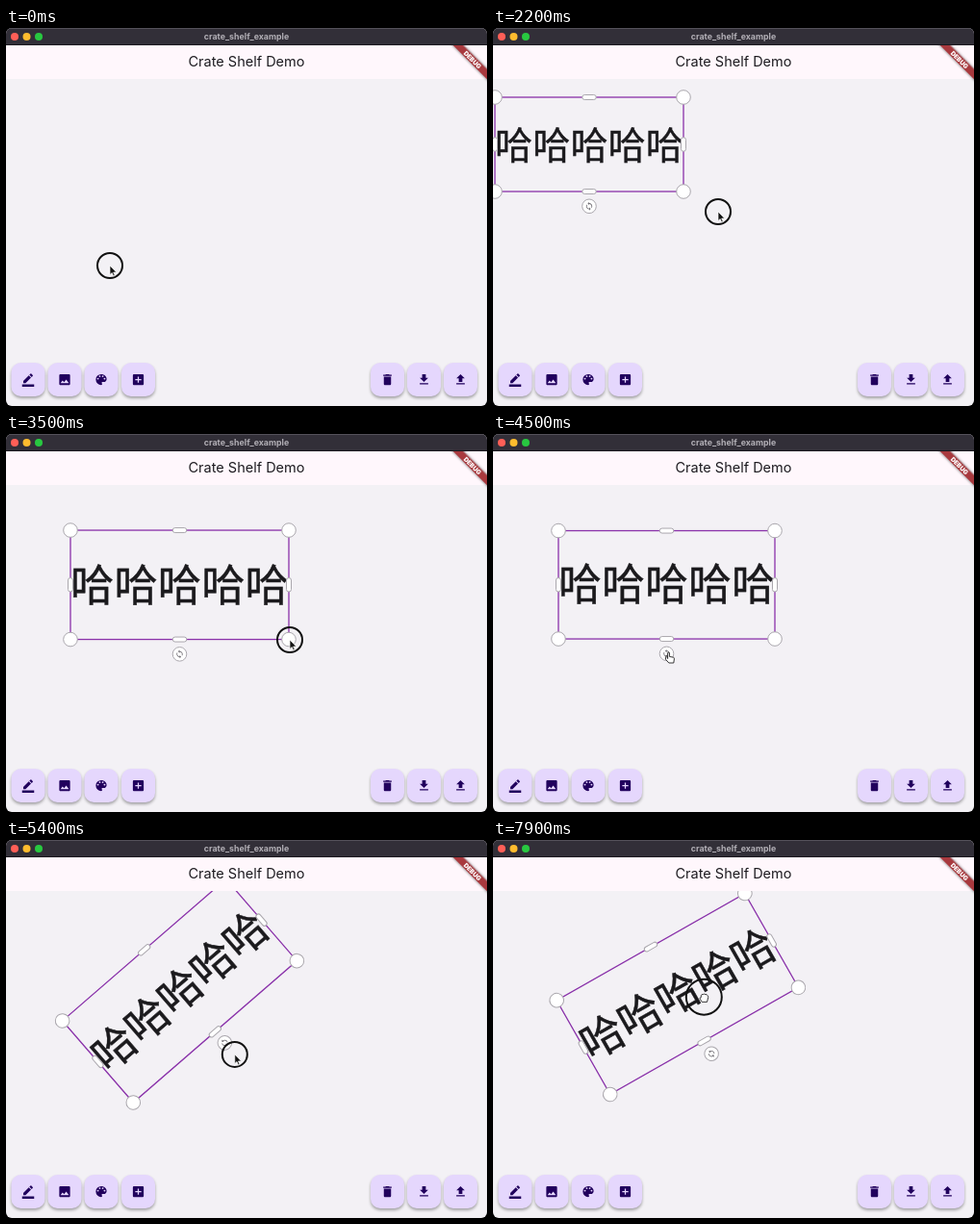
Write an HTML page that moves like this. It is 500 by 393 pixels and loops after 8 s.

```html
<!DOCTYPE html>
<html lang="zh-CN">
<head>
<meta charset="utf-8">
<style>
  html, body { margin: 0; width: 100%; height: 100%; overflow: hidden; background: #000; }
  svg { display: block; width: 100vw; height: 100vh; border-radius: 6px; }
  text { text-anchor: middle; font-family: Inter, Roboto, sans-serif; }
  .cjk { font-family: "Noto Sans CJK SC", "Noto Sans CJK", sans-serif; fill: #1b1a1d; }
  .fab { fill: #e5d7fd; filter: drop-shadow(0 2px 1.8px #0005); }
  .icon { fill: #21005d; }
  .knob { fill: #fff; stroke: #aaa7ad; stroke-width: 1; }
</style>
</head>
<body>
<svg viewBox="0 0 500 393">
  <defs>
    <clipPath id="board"><rect y="53" width="500" height="340"/></clipPath>
    <clipPath id="app"><rect y="18" width="500" height="375"/></clipPath>
  </defs>
  <rect width="500" height="393" fill="#f3f1f5"/>
  <rect y="18" width="500" height="35" fill="#fff7fc"/>
  <rect width="500" height="18" fill="#322f38"/>
  <path d="M0 .5H500" stroke="#55525b"/>
  <path d="M0 17.5H500" stroke="#1c1a20"/>
  <circle cx="9" cy="9" r="4" fill="#ff5f57"/>
  <circle cx="21.5" cy="9" r="4" fill="#febc2e"/>
  <circle cx="34" cy="9" r="4" fill="#28c840"/>
  <text x="250" y="11.7" font-size="8.8" font-weight="700" fill="#b3b0b7">crate_shelf_example</text>
  <text x="250" y="40" font-size="14.5" fill="#1d1b20">Crate Shelf Demo</text>

  <g clip-path="url(#board)">
    <g id="item">
      <rect id="frame" fill="none" stroke="#8a32aa" stroke-width="1.3"/>
      <text id="label" class="cjk" font-weight="500" stroke="#1b1a1d" stroke-width=".4">哈哈哈哈哈</text>
      <g id="field">
        <text class="cjk" x="-86" y="4.4" font-size="10.3">哈哈哈哈哈</text>
        <path d="M-112 15H112" stroke="#5c4a78"/>
        <path id="caret" d="M-61.5 -8V8" stroke="#3b3070" stroke-width="1.4"/>
      </g>
      <g id="knobs"></g>
      <g id="spin">
        <circle class="knob" r="7.3"/>
        <path fill="#6d6a70" transform="scale(.4) translate(-12 -12)" d="M12 4V1L8 5l4 4V6c3.31 0 6 2.69 6 6 0 1.01-.25 1.97-.7 2.8l1.46 1.46C19.54 15.03 20 13.57 20 12c0-4.42-3.58-8-8-8zm0 14c-3.31 0-6-2.69-6-6 0-1.01.25-1.97.7-2.8L5.24 7.74C4.46 8.97 4 10.43 4 12c0 4.42 3.58 8 8 8v3l4-4-4-4v3z"/>
      </g>
    </g>
  </g>

  <g id="fabs"></g>

  <g clip-path="url(#app)">
    <g transform="translate(500 18) rotate(45)">
      <rect x="-30" y="17.5" width="60" height="7.5" fill="#a8393e" style="filter:drop-shadow(0 0 1.8px #0009)"/>
      <text y="23.7" font-size="6.6" font-weight="900" fill="#fff">DEBUG</text>
    </g>
  </g>

  <g id="cursor">
    <circle id="ring" fill="none" stroke="#111" stroke-width="2"/>
    <path id="arrow" d="M0 0V9.5L2.2 7.6 3.7 11 5.2 10.3 3.7 7H6.8Z" fill="#111" stroke="#fff" stroke-width=".7"/>
    <path id="hand" transform="translate(-3.5 -2)" d="M2.6 1Q2.6 0 3.5 0T4.4 1V4.4L8.4 5.2Q9.6 5.5 9.4 6.8L8.8 11H3.8L.4 7.2Q1-.2 2.6 6.6Z" fill="#fff" stroke="#222" stroke-width=".9"/>
    <path id="fist" d="M-3 -1.5Q-2.5 -3.2 -1 -2.6Q.3 -3.6 1.5 -2.6Q3 -3.2 3.5 -1.6Q4.6 -1.4 4.4 .4L3.2 5.2H-2L-4.2 2Q-4.6 .4 -3 .4Z" fill="#fff" stroke="#222" stroke-width=".9"/>
  </g>
</svg>

<script>
const $ = id => document.getElementById(id);
const set = (el, attrs) => { for (const k in attrs) el.setAttribute(k, attrs[k]); return el; };
const add = (parent, tag, attrs) =>
  parent.appendChild(set(document.createElementNS("http://www.w3.org/2000/svg", tag), attrs));
const show = (id, on) => $(id).setAttribute("visibility", on ? "visible" : "hidden");

const buttons = [
  [23, "M22 24H2v-4h20v4zM13.06 5.19l3.75 3.75L7.75 18H4v-3.75l9.06-9.06zm4.82 2.68l-3.75-3.75 1.83-1.83c.39-.39 1.02-.39 1.41 0l2.34 2.34c.39.39.39 1.02 0 1.41z"],
  [61, "M21 19V5c0-1.1-.9-2-2-2H5c-1.1 0-2 .9-2 2v14c0 1.1.9 2 2 2h14c1.1 0 2-.9 2-2zM8.5 13.5l2.5 3 3.5-4.5 4.5 6H5z"],
  [99, "M12 3a9 9 0 0 0 0 18c.83 0 1.5-.67 1.5-1.5 0-.39-.15-.74-.39-1-.23-.27-.38-.62-.38-1 0-.83.67-1.5 1.5-1.5H16c2.76 0 5-2.24 5-5 0-4.42-4.03-8-9-8z" +
    [[6.5, 10.5], [9.5, 6.5], [14.5, 6.5], [17.5, 10.5]]
      .map(([x, y]) => `M${x - 1.5} ${y}a1.5 1.5 0 1 0 3 0a1.5 1.5 0 1 0-3 0z`).join("")],
  [137.5, "M19 3H5c-1.1 0-2 .9-2 2v14c0 1.1.9 2 2 2h14c1.1 0 2-.9 2-2V5c0-1.1-.9-2-2-2zm-2 10h-4v4h-2v-4H7v-2h4V7h2v4h4z"],
  [396.5, "M6 19c0 1.1.9 2 2 2h8c1.1 0 2-.9 2-2V7H6zM19 4h-3.5l-1-1h-5l-1 1H5v2h14z"],
  [434.5, "M19 9h-4V3H9v6H5l7 7zM5 18v2h14v-2z"],
  [472.5, "M9 16h6v-6h4l-7-7-7 7h4zM5 18h14v2H5z"]
];
for (const [x, d] of buttons) {
  const g = add($("fabs"), "g", { transform: `translate(${x} 365.5)` });
  add(g, "rect", { class: "fab", x: -17.5, y: -17.5, width: 35, height: 35, rx: 10 });
  add(g, "path", { class: "icon", d, "fill-rule": "evenodd", transform: "scale(.625) translate(-12 -12)" });
}

// Resize knobs: round at corners, pills at edge midpoints
const knobs = [];
for (const sx of [-1, 0, 1]) for (const sy of [-1, 0, 1]) {
  if (!sx && !sy) continue;
  const w = sx && sy ? 14.6 : sx ? 5 : 14.5;
  const h = sx && sy ? 14.6 : sx ? 14.5 : 5;
  const el = add($("knobs"), "rect",
    { class: "knob", x: -w / 2, y: -h / 2, width: w, height: h, rx: Math.min(w, h) / 2 });
  knobs.push({ el, sx, sy });
}

// Keys are [time, ...values], eased between neighbours
function track(keys, t) {
  const i = keys.findIndex(k => k[0] > t);
  if (i === 0) return keys[0].slice(1);
  if (i < 0) return keys[keys.length - 1].slice(1);
  const a = keys[i - 1], b = keys[i];
  const p = (t - a[0]) / (b[0] - a[0]), e = p * p * (3 - 2 * p);
  return a.slice(1).map((v, j) => v + (b[j + 1] - v) * e);
}

const centerKeys = [[2500, 100, 121], [2950, 180.5, 156.8], [7400, 180.5, 156.8], [7900, 191.8, 160]];
const widthKeys = [[3150, 196], [3500, 227], [3700, 225]];
const angleKeys = [[4550, 0], [5400, -40.9], [5900, -29.6]];
const reachKeys = [[4550, 72], [5400, 87.5], [5900, 72]];
const ringKeys = [[3700, 13], [3950, 0], [4500, 0], [4700, 13], [5850, 13], [6050, 0], [7400, 0], [7800, 18.5]];
const cursorKeys = [
  [0, 108, 247], [1300, 23, 366], [1900, 23, 366], [2200, 234, 191], [2500, 120, 130],
  [2950, 200.5, 166], [3150, 279, 207], [3500, 295, 214], [3700, 294, 213.5],
  [4200, 182.5, 229], [4550, 182.5, 229], [5900, 216, 219], [6300, 213, 215],
  [7000, 213, 215], [7400, 208, 160], [7900, 219.3, 163.2]
];

function draw(t) {
  const [cx, cy] = track(centerKeys, t);
  const [w] = track(widthKeys, t);
  const [angle] = track(angleKeys, t);
  const h = w / 2, size = w / 5;
  const exists = t >= 1900, editing = t >= 6250 && t < 7000;

  set($("item"), {
    transform: `translate(${cx} ${cy}) rotate(${angle})`,
    display: exists ? "inline" : "none"
  });
  set($("frame"), { x: -w / 2, y: -h / 2, width: w, height: h });
  set($("label"), { y: size * .37, "font-size": size });
  set($("spin"), { transform: `translate(0 ${h / 2 + 15.3})` });
  for (const { el, sx, sy } of knobs)
    set(el, { transform: `translate(${sx * w / 2} ${sy * h / 2})` });
  show("label", !editing);
  show("knobs", !editing);
  show("field", editing);
  show("caret", editing && (t - 6250) % 1000 < 500);

  let [x, y] = track(cursorKeys, t);
  if (t > 4550 && t < 5900) {
    const [reach] = track(reachKeys, t), a = -angle * Math.PI / 180;
    x = cx + reach * Math.sin(a);
    y = cy + reach * Math.cos(a);
  }
  const dragging = t >= 7400;
  const pointing = t >= 4100 && t <= 4600 || t >= 5900;
  const [r] = track(ringKeys, t);
  set($("cursor"), { transform: `translate(${x} ${y})` });
  set($("ring"), { r });
  show("ring", r > 1);
  show("arrow", !pointing);
  show("hand", pointing && !dragging);
  show("fist", dragging);
}

function tick() {
  draw(Math.floor(performance.now() % 8000 / 100) * 100);
  requestAnimationFrame(tick);
}
tick();
</script>
</body>
</html>
```
